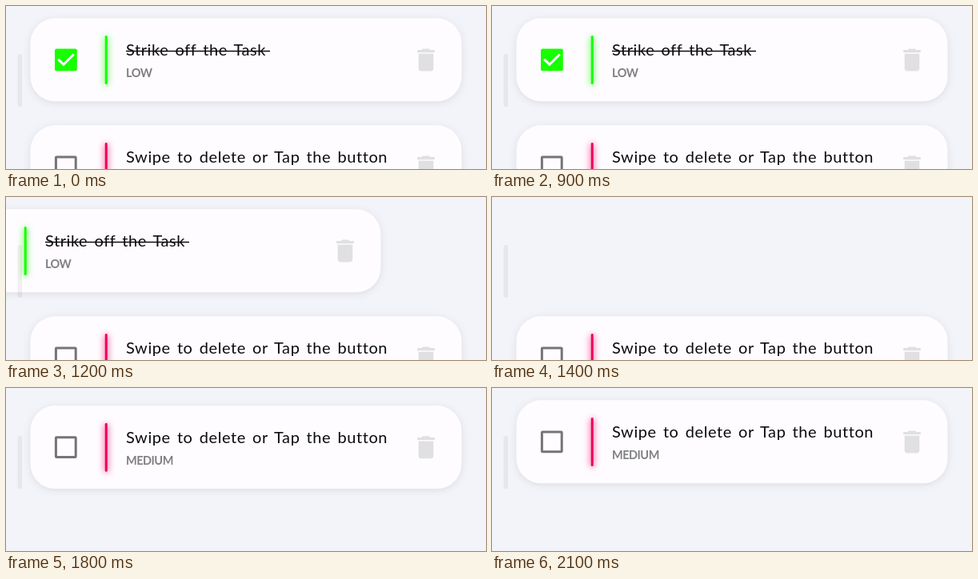
Recreate the animation shown at these times as an HTML page. Size 600 by 204 pixels, loop 3700 ms.

```html
<!DOCTYPE html>
<html lang="en">
<head>
<meta charset="utf-8">
<title>Task list</title>
<style>
  html, body { margin: 0; overflow: hidden; background: #f3f4f9; }
  svg { display: block; }
  text { font-family: Lato, "Open Sans", sans-serif; }
  .card { fill: #fefcff; filter: drop-shadow(0 2px 5px rgba(30, 30, 50, .1)); }
  .title { font-size: 20px; letter-spacing: .58px; word-spacing: 2.5px; fill: #0c0c0e; }
  .level { font-size: 14.5px; font-weight: 700; letter-spacing: -.5px; fill: #807f83; }
  .trash { fill: #e0dfe2; }
  .bar { fill: var(--tint); filter: drop-shadow(0 1px 4px var(--tint)); }
  #done { --tint: #17ff00; }
  #open { --tint: #f0005f; }
</style>
</head>
<body>
<svg width="600" height="204" viewBox="0 0 600 204">
  <defs>
    <g id="base">
      <rect class="card" x="30.5" y="15.3" width="539" height="104" rx="31"/>
      <rect class="bar" x="123.7" y="37" width="3.1" height="61" rx="1.5"/>
      <path class="trash" transform="translate(506.4 48.9) scale(1.55)"
        d="M6 19c0 1.1.9 2 2 2h8c1.1 0 2-.9 2-2V7H6zM19 4h-3.5l-1-1h-5l-1 1H5v2h14z"/>
    </g>
  </defs>
  <g id="open">
    <use href="#base"/>
    <rect x="62.4" y="55" width="24.8" height="24.8" rx=".8" fill="none" stroke="#757478" stroke-width="3"/>
    <text class="title" x="150" y="62">Swipe to delete or Tap the button</text>
    <text class="level" x="150" y="89">MEDIUM</text>
  </g>
  <g id="done">
    <use href="#base"/>
    <rect x="61" y="53.5" width="27.8" height="27.8" rx="2" fill="#17ff00"/>
    <path d="M65.2 66.6l6.7 6.7 12.8-12.8" fill="none" stroke="#fff" stroke-width="2.9"/>
    <text class="title" x="150" y="62">Strike off the Task</text>
    <path d="M150 56.5H330" stroke="#0c0c0e" stroke-width="1.5"/>
    <text class="level" x="150" y="89">LOW</text>
  </g>
  <rect x="14.5" y="60" width="5.5" height="66" rx="2" fill="#000" opacity=".05"/>
</svg>
<script>
  const LOOP = 3700, STEP = 100;
  const done = document.getElementById('done');
  const open = document.getElementById('open');
  const progress = (t, start, length) => Math.min(1, Math.max(0, (t - start) / length));
  const move = (el, x, y) => el.setAttribute('transform', `translate(${x} ${y})`);

  function draw(now) {
    const t = Math.floor(now % LOOP / STEP) * STEP;
    // The finished task is flicked away, then the next one rises into its place.
    move(done, -600 * progress(t, 1000, 400) ** 2.57, 0);
    move(open, 0, 134 * (1 - progress(t, 1662, 219)) ** 3);
    requestAnimationFrame(draw);
  }
  draw(0);
</script>
</body>
</html>
```
